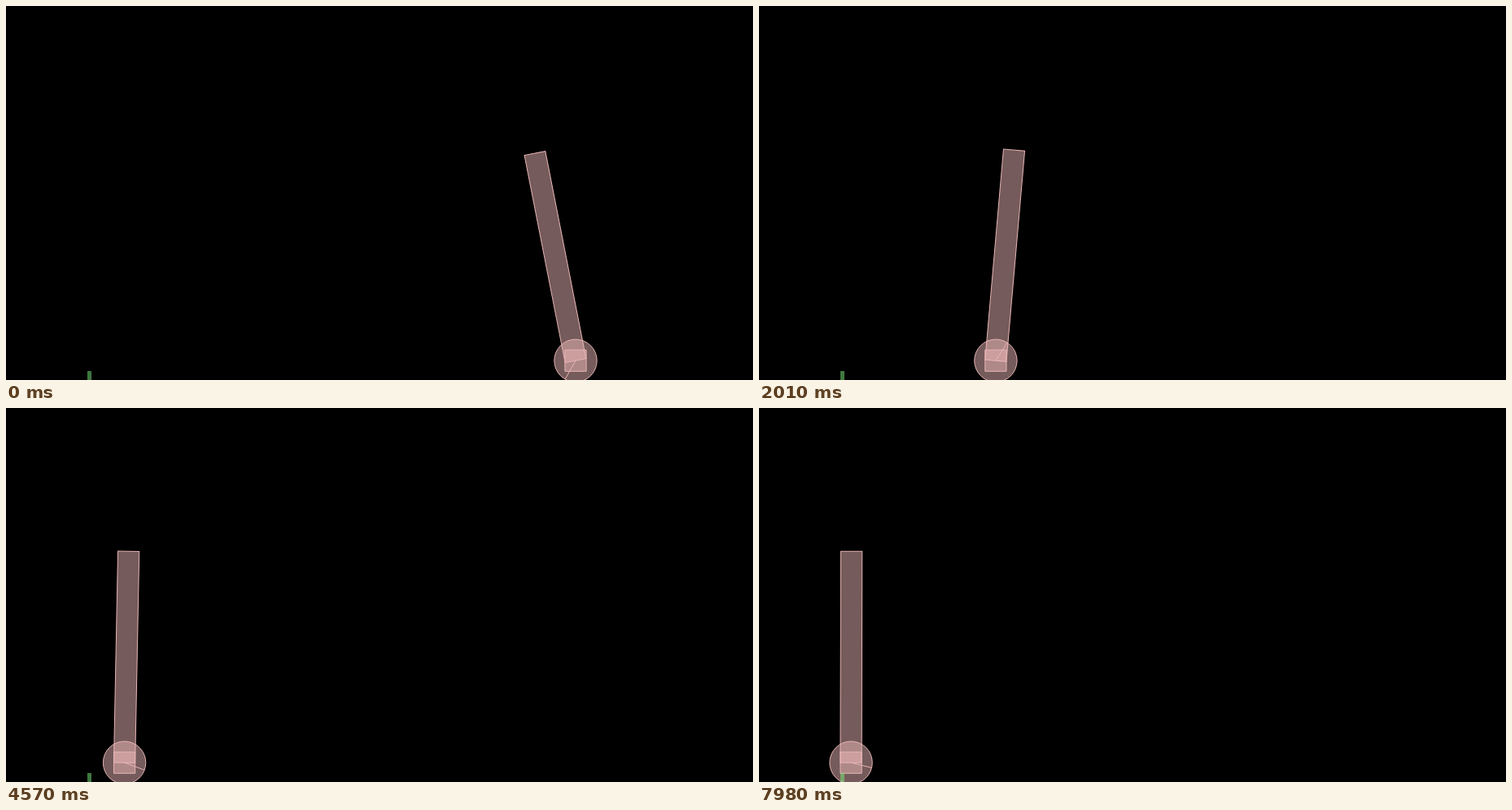
An HTML page with a canvas for the animation above (8000 ms loop, 918 by 460 pixels).

```html
<!DOCTYPE html>
<html lang="en">
<head>
<meta charset="utf-8">
<title>Balancing wheel</title>
<style>
html, body { margin: 0; width: 100%; height: 100%; overflow: hidden; background: #000; }
canvas { display: block; }
</style>
</head>
<body>
<canvas id="stage" width="918" height="460"></canvas>
<script>
const ctx = document.getElementById('stage').getContext('2d');
const LOOP = 8000, STEP = 57.83, LEAD = 15;
const RADIUS = 26.2, HALF = 13.1, ROD = 260;
const START_X = 700, GOAL_X = 108.6, AXLE_Y = 436.2;
const RAD = Math.PI / 180;

// Slow approach to the goal, and the fading swing of the first seconds
const settle = t => Math.exp(-0.62 * t);
const swing = t => Math.exp(-0.73 * t * t);

const axleX = t => GOAL_X + settle(t) * (628 + swing(t) * (131 * t - 36.6));
const lean = t => RAD * settle(t) * (19 - 30.1 * swing(t));

// The wheel rolls with a little slip
const spin = (t, x) => (x - START_X) / 25 + RAD * (119.5 + 20 * t);

function paint(shape) {
  ctx.beginPath();
  shape();
  ctx.fill();
  ctx.stroke();
}

function draw(t) {
  const x = axleX(t);
  const spoke = spin(t, x);

  ctx.fillStyle = '#000';
  ctx.fillRect(0, 0, 918, 460);

  ctx.save();
  ctx.translate(x, AXLE_Y);
  ctx.fillStyle = 'rgba(233, 181, 181, 0.5)';
  ctx.strokeStyle = 'rgb(233, 181, 181)';
  ctx.lineWidth = 1;

  ctx.save();
  ctx.rotate(lean(t));
  paint(() => ctx.rect(-HALF, -ROD, 2 * HALF, ROD));
  ctx.restore();

  paint(() => ctx.rect(-HALF, -HALF, 2 * HALF, 2 * HALF));
  paint(() => ctx.arc(0, 0, RADIUS, 0, 2 * Math.PI));

  ctx.beginPath();
  ctx.moveTo(0, 0);
  ctx.lineTo(RADIUS * Math.cos(spoke), RADIUS * Math.sin(spoke));
  ctx.stroke();
  ctx.restore();

  // Goal marker
  ctx.fillStyle = 'rgba(127, 240, 127, 0.5)';
  ctx.fillRect(100, 449, 5, 11);
}

function loop() {
  const ms = performance.now() % LOOP;
  const held = Math.floor((ms + LEAD) / STEP) * STEP;
  draw(held / 1000);
  requestAnimationFrame(loop);
}
loop();
</script>
</body>
</html>
```
